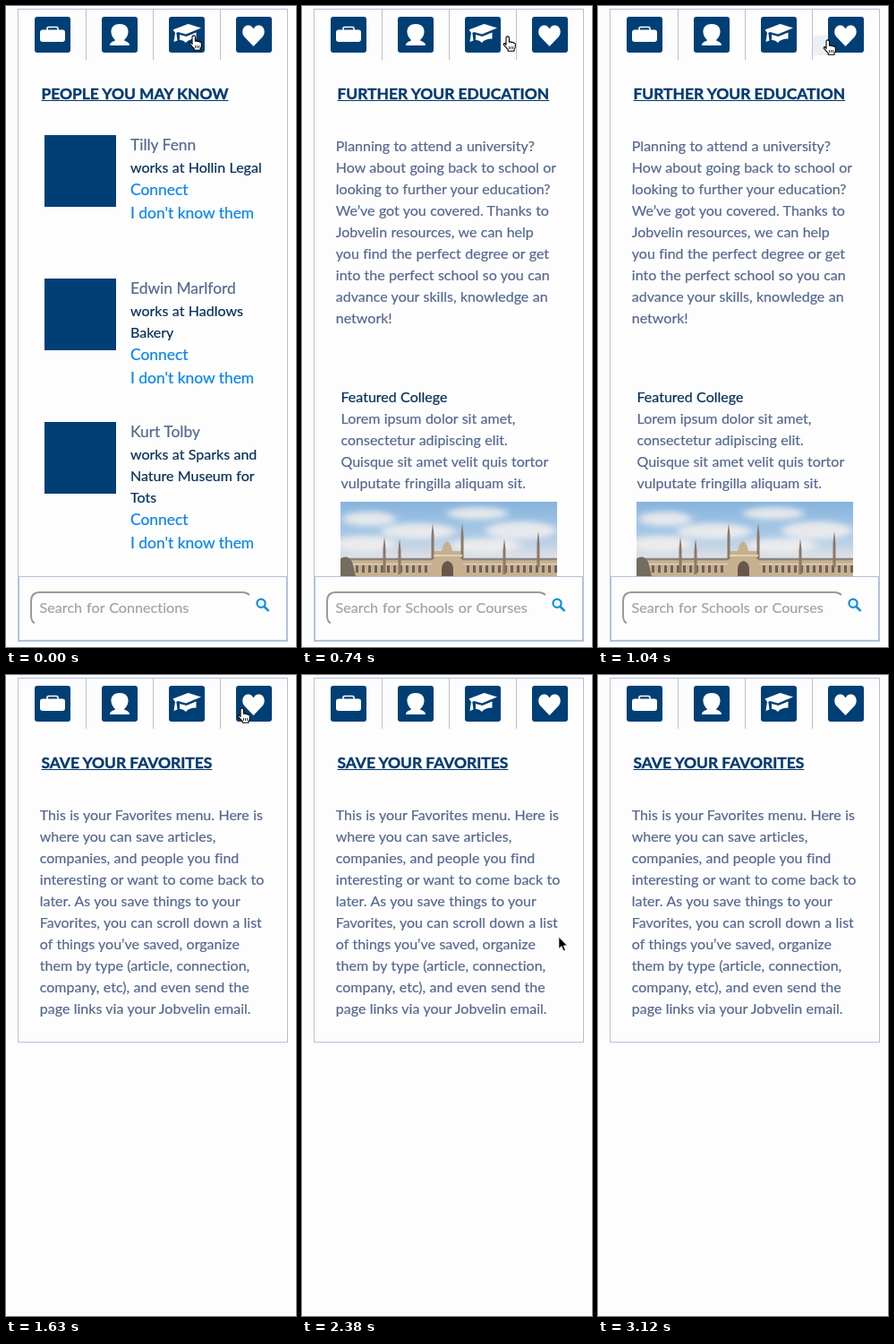
An HTML page for the animation above (4.02 s loop, 324 px wide and 715 px high).

```html
<!DOCTYPE html>
<html lang="en">
<head>
<meta charset="utf-8">
<title>Sidebar tabs</title>
<style>
  :root { --navy: #003f75; --line: #b3c1dc; --slate: #55688f; --ink: #062f58; --link: #0a84f5; }
  html, body { margin: 0; width: 100%; height: 100%; overflow: hidden; background: #fdfdfd; }
  #stage { position: relative; width: 324px; height: 715px; overflow: hidden;
    font: 16px/24px Lato, sans-serif; font-variant-ligatures: none; word-spacing: .3px;
    -webkit-text-stroke: .2px; color: var(--slate); white-space: nowrap; }
  #stage > svg, .panel, .panel > * { position: absolute; margin: 0; }
  svg { left: 0; top: 0; overflow: visible; }
  .panel { left: 0; top: 0; width: 324px; height: 715px; }
  .box { box-sizing: border-box; left: 13px; top: 3px; width: 302px; height: 706px; border: 1px solid var(--line); }
  .short { height: 407px; }
  h2 { left: 39.5px; top: 86px; font-size: 17.4px; font-weight: 700; word-spacing: 0; color: #003a6e;
    -webkit-text-stroke: .4px; text-decoration: underline 1px; text-underline-offset: 1px; text-decoration-skip-ink: none; }
  .copy { left: 37.8px; top: 144px; }
  .college { left: 43.5px; top: 424px; }
  .college b { font-weight: 400; color: var(--ink); }

  .person { left: 139px; color: var(--ink); }
  .person::before { content: ""; position: absolute; left: -96px; top: 2px; width: 80px; height: 80px; background: var(--navy); }
  .person b, .person i { display: block; font-size: 17.4px; font-weight: 400; font-style: normal; line-height: 26px; word-spacing: 0; }
  .person b { color: var(--slate); }
  .person i { color: var(--link); }

  .search { box-sizing: border-box; left: 14px; top: 636px; width: 300px; height: 72px;
    border: 1px solid var(--line); background: #fdfdfd; }
  .search span { position: absolute; left: 22.5px; top: 22px; font-size: 16.2px; word-spacing: .8px; color: #a2a2a2; }
  .search svg { position: absolute; left: -15px; top: -637px; }

  .panel, #hover, #hand, #arrow { animation: 4020ms step-end infinite; }
  #people { animation-name: people; }
  #school { animation-name: school; }
  #saved { animation-name: saved; }
  #hover { animation-name: hover; }
  #hand { animation-name: hand; }
  #arrow { animation-name: arrow; }

  @keyframes people { 0% { visibility: visible } 7.462%, 100% { visibility: hidden } }
  @keyframes school { 0% { visibility: hidden } 7.462% { visibility: visible } 40.547%, 100% { visibility: hidden } }
  @keyframes saved { 0% { visibility: hidden } 40.547%, 100% { visibility: visible } }
  @keyframes hover {
    0% { visibility: hidden; clip-path: inset(0 14px 0 0) }
    22.139% { visibility: visible; clip-path: inset(0 14px 0 0) }
    25.87% { visibility: visible; clip-path: inset(0 7px 0 0) }
    29.601% { visibility: visible; clip-path: inset(0 1px 0 0) }
    33.333% { visibility: visible; clip-path: inset(0) }
    40.547%, 100% { visibility: hidden; clip-path: inset(0) }
  }
  @keyframes hand {
    0% { transform: translate(204px, 32px) }
    18.407% { transform: translate(224px, 33px) }
    22.139% { transform: translate(244px, 37px) }
    25.87% { transform: translate(251px, 37px) }
    29.601% { transform: translate(257px, 37px) }
    33.333% { transform: translate(258px, 36px) }
    59.203%, 100% { transform: translate(-40px, 0) }
  }
  @keyframes arrow {
    0% { transform: translate(-40px, 0) }
    59.203% { transform: translate(285px, 291px) }
    62.935% { transform: translate(298px, 479px) }
    66.666% { transform: translate(295px, 597px) }
    70.149% { transform: translate(283px, 660px) }
    73.88% { transform: translate(282px, 700px) }
    77.611%, 100% { transform: translate(-40px, 0) }
  }
</style>
</head>
<body>
<div id="stage">

  <svg width="0" height="0">
    <defs>
      <g id="field" fill="none">
        <path d="M32 688.5Q28 686 28 680V664Q28 654 38 654H264Q269 654 272 657" stroke="#9b9b9b" stroke-width="2"/>
        <g stroke="#0d8fe0">
          <circle cx="285" cy="666.3" r="4.6" stroke-width="2.2"/>
          <path d="M288.6 670L292.8 674.2" stroke-width="2.6" stroke-linecap="round"/>
        </g>
      </g>
      <path id="spire" d="M-1.5 40V14L-1 8L0 0L1 8L1.5 14V40Z"/>
      <linearGradient id="sky" x2="0" y2="1">
        <stop offset="0" stop-color="#86b4dd"/>
        <stop offset=".45" stop-color="#a9c9e6"/>
        <stop offset=".8" stop-color="#e6e5e4"/>
      </linearGradient>
      <clipPath id="crop"><path d="M43 553H285V636H43Z"/></clipPath>
      <filter id="soft" x="-20%" y="-50%" width="140%" height="200%"><feGaussianBlur stdDeviation="5 3"/></filter>
    </defs>
  </svg>

  <section class="panel" id="people">
    <div class="box"></div>
    <h2>PEOPLE YOU MAY KNOW</h2>
    <p class="person" style="top:142px"><b>Tilly Fenn</b>works at Hollin Legal<i>Connect</i><i>I don't know them</i></p>
    <p class="person" style="top:302px"><b>Edwin Marlford</b>works at Hadlows<br>Bakery<i>Connect</i><i>I don't know them</i></p>
    <p class="person" style="top:462px"><b>Kurt Tolby</b>works at Sparks and<br>Nature Museum for<br>Tots<i>Connect</i><i>I don't know them</i></p>
    <div class="search"><span>Search for Connections</span><svg width="324" height="715"><use href="#field"/></svg></div>
  </section>

  <section class="panel" id="school">
    <div class="box"></div>
    <h2>FURTHER YOUR EDUCATION</h2>
    <p class="copy">Planning to attend a university?<br>How about going back to school or<br>looking to further your education?<br>We’ve got you covered. Thanks to<br>Jobvelin resources, we can help<br>you find the perfect degree or get<br>into the perfect school so you can<br>advance your skills, knowledge an<br>network!</p>
    <p class="college"><b>Featured College</b><br>Lorem ipsum dolor sit amet,<br>consectetur adipiscing elit.<br>Quisque sit amet velit quis tortor<br>vulputate fringilla aliquam sit.</p>
    <svg width="324" height="715">
      <g clip-path="url(#crop)">
        <path d="M43 553H285V636H43Z" fill="url(#sky)"/>
        <g fill="#f3f0ee" opacity=".85" filter="url(#soft)">
          <ellipse cx="75" cy="572" rx="30" ry="8"/>
          <ellipse cx="130" cy="586" rx="42" ry="9"/>
          <ellipse cx="196" cy="566" rx="34" ry="7"/>
          <ellipse cx="245" cy="585" rx="40" ry="10"/>
          <ellipse cx="70" cy="600" rx="35" ry="9"/>
          <ellipse cx="205" cy="602" rx="40" ry="8"/>
        </g>
        <path d="M43 616H146V608H156Q157 600 162 597Q167 600 168 608H179V616H285V636H43Z" fill="#c6b08f"/>
        <path d="M43 617H146M179 617H285" stroke="#8b8382" stroke-width="2.5"/>
        <path d="M46 628H143M184 628H285" stroke="#6c6058" stroke-width="8" stroke-dasharray="3 4"/>
        <path d="M43 622.500H145M180 622.500H285" stroke="#dfcdaf" stroke-width="1.500"/>
        <g fill="#8c7968">
          <use href="#spire" x="92" y="592"/>
          <use href="#spire" x="109" y="594"/>
          <use href="#spire" x="146" y="577"/>
          <use href="#spire" x="179" y="577"/>
          <use href="#spire" x="226" y="594"/>
          <use href="#spire" x="264" y="586"/>
        </g>
        <path d="M156 636V627Q157 620 162.500 619Q168 620 169 627V636Z" fill="#66574d"/>
        <path d="M147 613H179" stroke="#e2d3b8" stroke-width="2"/>
        <path d="M43 636V617Q50 611 56 620L60 636Z" fill="#736c60"/>
      </g>
    </svg>
    <div class="search"><span>Search for Schools or Courses</span><svg width="324" height="715"><use href="#field"/></svg></div>
  </section>

  <section class="panel" id="saved">
    <div class="box short"></div>
    <h2>SAVE YOUR FAVORITES</h2>
    <p class="copy">This is your Favorites menu. Here is<br>where you can save articles,<br>companies, and people you find<br>interesting or want to come back to<br>later. As you save things to your<br>Favorites, you can scroll down a list<br>of things you’ve saved, organize<br>them by type (article, connection,<br>company, etc), and even send the<br>page links via your Jobvelin email.</p>
  </section>

  <svg width="324" height="715">
    <path d="M89.500 4V60M164.500 4V60M239.500 4V60" stroke="#b3c1dc"/>
    <path id="hover" d="M240 33H260V37H274V55H240Z" fill="#ecf0f5"/>
    <g fill="#003f75">
      <rect x="32" y="12" width="40" height="40" rx="3"/>
      <rect x="107" y="12" width="40" height="40" rx="3"/>
      <rect x="182" y="12" width="40" height="40" rx="3"/>
      <rect x="257" y="12" width="40" height="40" rx="3"/>
    </g>
    <g fill="#fff">
      <rect x="38" y="26.500" width="28" height="13.500" rx="3"/>
      <path d="M46 27V25Q46 23.500 48 23.500H56Q58 23.500 58 25V27" fill="none" stroke="#fff" stroke-width="1.600"/>
      <path d="M127 20C133.500 20 137 24 136.500 29.500C136.200 33.500 134 36 132 38C133 40 138 39.500 138 44H116C116 39.500 121 40 122 38C120 36 117.800 33.500 117.500 29.500C117 24 120.500 20 127 20Z"/>
      <path d="M186.500 26.500L203.500 20L218 24.500L201 31.500L192 29L190.300 30L191.500 38.500L187.500 40L189 30Z"/>
      <path d="M194 32L201.500 34L212.500 29.500V36.500Q204 36.500 201 41Q198 37.500 194 38Z"/>
      <path d="M276.500 45L266 34C262.500 29.500 264.500 22 270 21.500C273 21.300 275.300 23 276.500 25.500C277.700 23 280 21.300 283 21.500C288.500 22 290.500 29.500 287 34Z"/>
    </g>
    <g id="hand">
      <path d="M4 10.500V2.600a1.700 1.700 0 0 1 3.400 0V7.200q1.500-.9 2.600.4q1.500-.6 2.300.6q2-.4 2 1.500V12q0 2-1.300 3.500V17.200H6.200V15.600L1.600 10.600q-.8-1.600.6-2q1-.1 1.800 1.900z" fill="#fff" stroke="#000" stroke-width="1.100" stroke-linejoin="round"/>
      <path d="M7.500 12V15M9.500 12V15M11.500 12V15" stroke="#000" stroke-width=".8"/>
    </g>
    <path id="arrow" d="M1.800 1V14.600L4.900 11.800L7.100 16.900L9.500 15.900L7.400 11H11.600Z" fill="#000" stroke="#fff"/>
  </svg>
</div>
</body>
</html>
```
